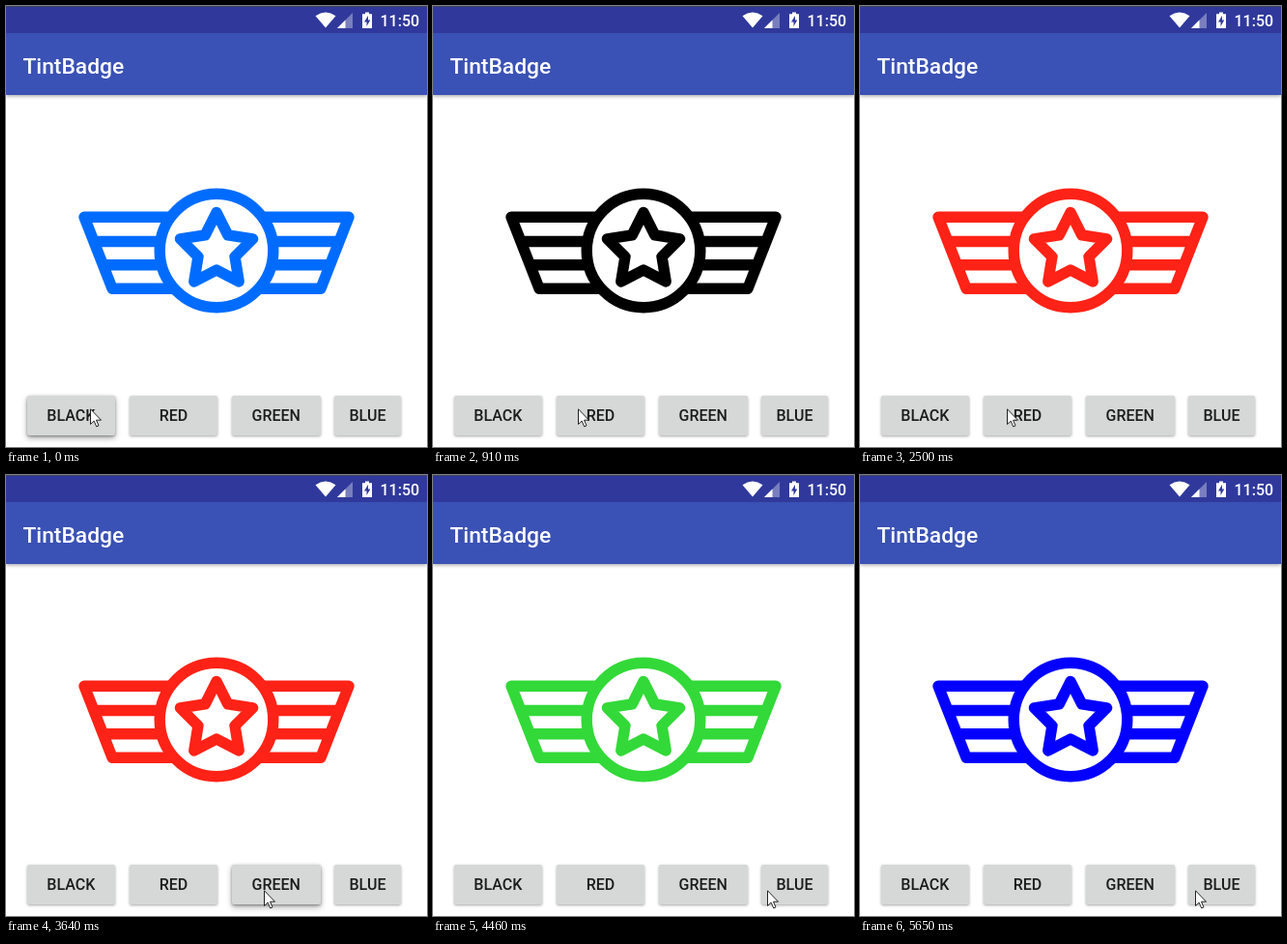
Recreate the animation shown at these times as an HTML page. Size 436 px wide and 456 px high, loop 5910 ms.

```html
<!DOCTYPE html>
<html lang="en">
<head>
<meta charset="utf-8">
<title>TintBadge</title>
<style>
  html, body { margin: 0; width: 100%; height: 100%; overflow: hidden; background: #fff; }
  body { position: relative; font: 500 16px Roboto, sans-serif; }
  svg, .bar, .status, button, .cursor { position: absolute; }

  .status { left: 0; top: 0; width: 436px; height: 28px; background: #30399b; border-top: 1px solid #40435f; box-sizing: border-box; }
  .bar { left: 0; top: 28px; width: 436px; height: 64px; background: #3a51b5; box-shadow: 0 1px 4px rgba(0,0,0,.4); }
  .scene { left: 0; top: 0; }
  .label { fill: #fff; }
  .title { font-size: 22.8px; }

  .emblem { fill: none; stroke: currentColor; stroke-width: 11.4; stroke-linejoin: round; animation: tint 5910ms step-end infinite; }

  button {
    top: 403px; height: 41px; padding: 0; border: 0; border-radius: 2px;
    background: #d6d7d7; color: #1c1c1c; font: inherit; line-height: 42px;
    box-shadow: 0 1px 3px rgba(0,0,0,.36);
  }
  button::after {
    content: ""; position: absolute; inset: 0; border-radius: 2px; opacity: 0;
    box-shadow: 0 3px 6px rgba(0,0,0,.3);
    animation: 5910ms linear infinite;
  }
  .black { left: 21.5px; width: 91.5px; }
  .red { left: 128px; width: 91px; }
  .green { left: 234px; width: 91.5px; }
  .blue { left: 340px; width: 69px; }
  .black::after { animation-name: pressBlack; }
  .red::after { animation-name: pressRed; }
  .green::after { animation-name: pressGreen; }
  .blue::after { animation-name: pressBlue; }

  .cursor { left: 0; top: 0; animation: travel 5910ms linear infinite; }

  @keyframes tint {
    0% { color: #006cff; }
    3.72% { color: #000; }
    36.04% { color: #ff2216; }
    62.61% { color: #32d938; }
    87.82%, 100% { color: #0400ff; }
  }
  @keyframes pressBlack {
    0%, 3.72% { opacity: 1; }
    7.1%, 100% { opacity: 0; }
  }
  @keyframes pressRed {
    0%, 32.3% { opacity: 0; }
    32.31% { opacity: .7; }
    33.33%, 36.04% { opacity: 1; }
    39.42%, 100% { opacity: 0; }
  }
  @keyframes pressGreen {
    0%, 56.34% { opacity: 0; }
    56.35% { opacity: .6; }
    58%, 62.61% { opacity: 1; }
    66.16%, 100% { opacity: 0; }
  }
  @keyframes pressBlue {
    0%, 82.73% { opacity: 0; }
    82.74% { opacity: .6; }
    84.4%, 87.82% { opacity: 1; }
    91.37%, 100% { opacity: 0; }
  }
  @keyframes travel {
    0% { transform: translate(87px, 416px); }
    10.83% { transform: translate(87px, 416px); animation-timing-function: ease-in-out; }
    15.4%, 41.8% { transform: translate(150px, 416px); }
    42.3% { transform: translate(152px, 416px); animation-timing-function: ease-in; }
    45.85% { transform: translate(233px, 426px); animation-timing-function: ease-out; }
    46.87%, 66.16% { transform: translate(267px, 429px); }
    68.7% { transform: translate(257px, 423px); animation-timing-function: ease-in; }
    72.76% { transform: translate(320px, 418px); animation-timing-function: ease-out; }
    75.47%, 92.55% { transform: translate(346px, 429px); }
    94.08% { transform: translate(370px, 418px); }
    95.6%, 100% { transform: translate(347px, 429px); }
  }
</style>
</head>
<body>
<div class="bar"></div>
<div class="status"></div>

<svg class="scene" width="436" height="456" viewBox="0 0 436 456">
  <g fill="#fff">
    <path d="M331 22.5L320.5 10.2Q331 3 341.500 10.200Z"/>
    <path d="M359 7V23H343Z" opacity=".35"/>
    <path d="M351.500 14.500V23H343Z"/>
    <path d="M372 6.500h4v1.800h3V23h-10V8.300h3Z"/>
  </g>
  <path d="M375 10l-4 6.500h2.500V21l3.800-6.500H375Z" fill="#30399b"/>
  <text class="label" x="387.500" y="21">11:50</text>
  <text class="label title" x="17.500" y="69.500">TintBadge</text>

  <g class="emblem">
    <circle cx="218" cy="253" r="58.800"/>
    <path id="star"/>
    <g id="wing">
      <path d="M170 218.200H81L110 292.200H174M91 243.500H160M101 267.700H161"/>
    </g>
    <use href="#wing" transform="matrix(-1 0 0 1 436 0)"/>
  </g>
</svg>

<button class="black">BLACK</button>
<button class="red">RED</button>
<button class="green">GREEN</button>
<button class="blue">BLUE</button>

<svg class="cursor" width="14" height="21" viewBox="0 0 14 21">
  <path d="M.5 .8V16.500L4.200 13.100L6.700 18.900L9 17.900L6.500 12.200H11.500Z" fill="#fff" stroke="#222" stroke-width="1"/>
</svg>

<script>
  const points = Array.from({ length: 10 }, (_, i) => {
    const radius = i % 2 ? 20 : 39.5;
    const angle = (i / 5 - 0.5) * Math.PI;
    return [218 + radius * Math.cos(angle), 253 + radius * Math.sin(angle)];
  });
  document.getElementById("star").setAttribute("d", "M" + points.join("L") + "Z");
</script>
</body>
</html>
```
